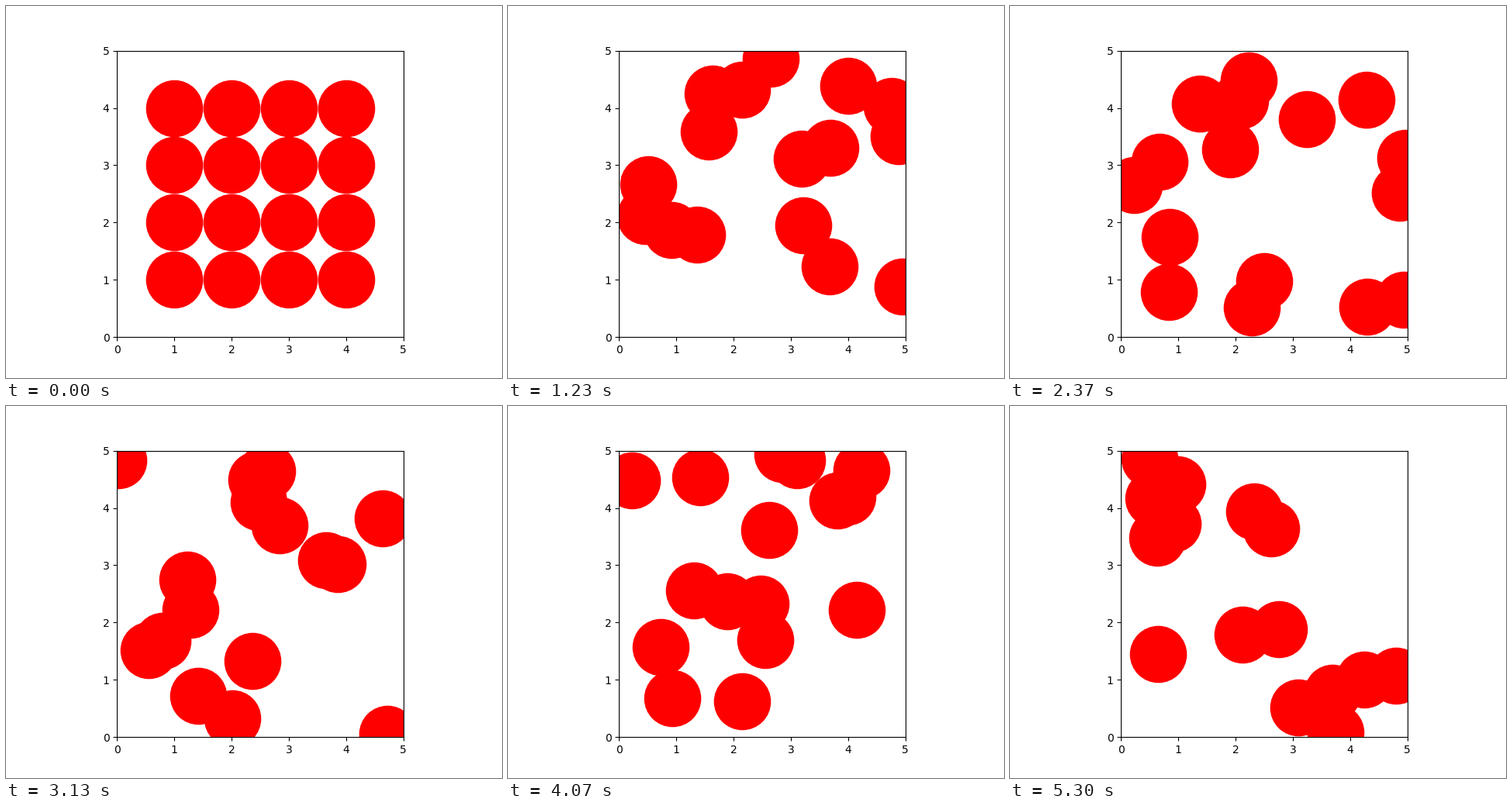
Recreate the animation shown at these times as a matplotlib script. Size 640 by 480 pixels, loop 5330 ms.

```python
import numpy as np
import matplotlib.pyplot as plt
from matplotlib.animation import FuncAnimation

SIZE = 5       # side of the periodic box
TICK_MS = 10   # display clock
TICKS = 533    # one loop
STEPS = 160    # simulation steps per loop, 30 a second

# Discs start on a 4 x 4 lattice; positions are complex numbers x + iy.
x, y = np.mgrid[1:5, 1:5]
start = x + 1j * y

# The free parameters: one constant drift per disc, as the way covered
# between the first and the last step.
drift = np.array([
    [-2.31 + 4.77j, -0.35 - 0.55j, 2.42 + 2.53j, 2.75 + 1.08j],
    [2.80 - 4.93j, 5.12 + 4.79j, 0.62 + 5.64j, 7.24 - 3.00j],
    [-7.01 + 3.41j, 2.90 - 3.28j, 4.32 + 5.94j, 7.57 + 0.17j],
    [4.10 - 0.48j, 6.50 + 2.86j, -3.37 - 4.52j, 3.76 - 2.12j],
])

fig = plt.figure(figsize=(6.4, 4.8), dpi=100)
ax = fig.add_subplot(aspect="equal", xlim=(0, SIZE), ylim=(0, SIZE))
discs, = ax.plot([], [], "o", color="#ff0000", ms=52)


def update(tick):
    """Move every disc in a straight line, wrapping at the box edges."""
    step = (3 * tick + 1) // 10  # 30 steps a second, rounded to whole ticks
    pos = (start + drift * step / (STEPS - 1)).ravel()
    discs.set_data(pos.real % SIZE, pos.imag % SIZE)
    return discs,


anim = FuncAnimation(fig, update, frames=TICKS, interval=TICK_MS,
                     repeat=True, repeat_delay=0, blit=False)
plt.show()
```
